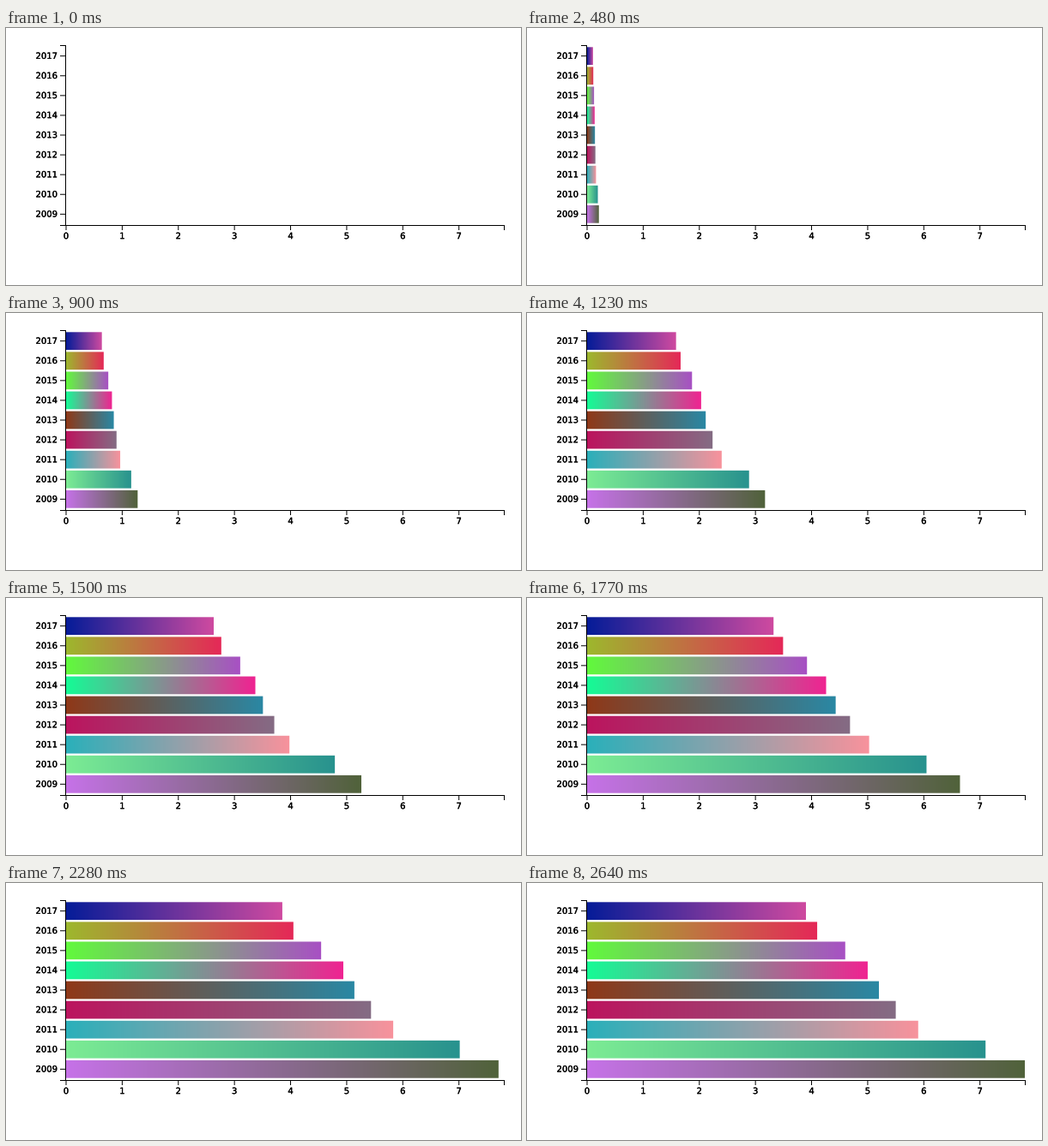
Recreate the animation shown at these times as a matplotlib script. Size 600 by 300 pixels, loop 2.67 s.

```python
import numpy as np
import matplotlib.pyplot as plt
from matplotlib import patheffects
from matplotlib.animation import FuncAnimation
from matplotlib.colors import to_rgb
from matplotlib.patches import Rectangle

W, H, DPI = 600, 300, 100
FRAMES, INTERVAL = 89, 30
LEFT, RIGHT, TOP, BOTTOM = 70, 580, 20, 230
AXIS_X = LEFT - 1
TICK = 6
FONT = 10                        # pixels
DIGIT = 0.636 * FONT             # advance of one digit
LAST_YEAR = 2017

VALUES = [3.9, 4.1, 4.6, 5.0, 5.2, 5.5, 5.9, 7.1, 7.8]
STARTS = ["#051c98", "#9db82d", "#61fa3c", "#14fc96", "#8f3818",
          "#bc145e", "#2ab0ba", "#7cec94", "#c672e8"]
ENDS = ["#cf4aa0", "#e52858", "#a850c4", "#f02391", "#2a88a4",
        "#846c84", "#f8929c", "#28928e", "#50623a"]

UNIT = (RIGHT - LEFT) / max(VALUES)
STEP = (BOTTOM - TOP) / (len(VALUES) + 0.1)   # bands with 10% padding
BAND = 0.9 * STEP

fig = plt.figure(figsize=(W / DPI, H / DPI), dpi=DPI, facecolor="white")
ax = fig.add_axes([0, 0, 1, 1])
ax.axis("off")


def band_top(k):
    return TOP + 0.1 * STEP + k * STEP


def coverage(size, start, end):
    """Share of each pixel along one axis that lies between start and end."""
    px = np.arange(size)
    return np.clip(np.minimum(px + 1, end) - np.maximum(px, start), 0, 1)


def ease_cubic(t):
    return 4 * t ** 3 if t < 0.5 else 1 - 4 * (1 - t) ** 3


def draw_bars(i):
    grow = ease_cubic((i + 1) / (FRAMES + 1))
    img = np.ones((H, W, 3))
    for k, (value, start, end) in enumerate(zip(VALUES, STARTS, ENDS)):
        width = value * UNIT * grow
        y = band_top(k)
        cover = np.outer(coverage(H, y, y + BAND),
                         coverage(W, LEFT, LEFT + width))[..., None]
        pos = np.clip((np.arange(W) + 0.5 - LEFT) / width, 0, 1)[:, None]
        color = np.array(to_rgb(start)) * (1 - pos) + np.array(to_rgb(end)) * pos
        img = img * (1 - cover) + color * cover
    return img


def block(x, y, w, h):
    ax.add_patch(Rectangle((x, y), w, h, fc="black", lw=0, snap=False, zorder=2))


def label(x, y, text):
    # A hairline outline gives the slightly heavy look of smoothed type.
    ax.text(x, y, text, family="DejaVu Sans", size=FONT * 72 / DPI,
            color="black", ha="left", va="baseline", zorder=3,
            path_effects=[patheffects.withStroke(linewidth=0.2,
                                                 foreground="black")])


def draw_axes():
    block(AXIS_X, TOP, 1, BOTTOM - TOP + 1)
    for y in (TOP, BOTTOM):
        block(AXIS_X - TICK, y, TICK, 1)
    for k in range(len(VALUES)):
        y = band_top(k) + BAND / 2
        block(AXIS_X - TICK, y - 0.5, TICK, 1)
        label(AXIS_X - TICK - 3 - 4 * DIGIT, y + 0.32 * FONT, str(LAST_YEAR - k))

    block(LEFT, BOTTOM, RIGHT - LEFT + 1, 1)
    block(RIGHT, BOTTOM, 1, TICK)
    for n in range(int(max(VALUES)) + 1):
        x = LEFT + n * UNIT
        block(x - 0.5, BOTTOM, 1, TICK)
        label(x - DIGIT / 2, BOTTOM + TICK + 3 + 0.71 * FONT, str(n))


def update(i):
    picture.set_data(draw_bars(i))
    return [picture]


picture = ax.imshow(draw_bars(0), extent=(0, W, H, 0),
                    interpolation="nearest", aspect="auto", zorder=1)
draw_axes()
ax.set_xlim(0, W)
ax.set_ylim(H, 0)

anim = FuncAnimation(fig, update, frames=FRAMES, interval=INTERVAL,
                     repeat=True, repeat_delay=0, blit=False)
plt.show()
```
